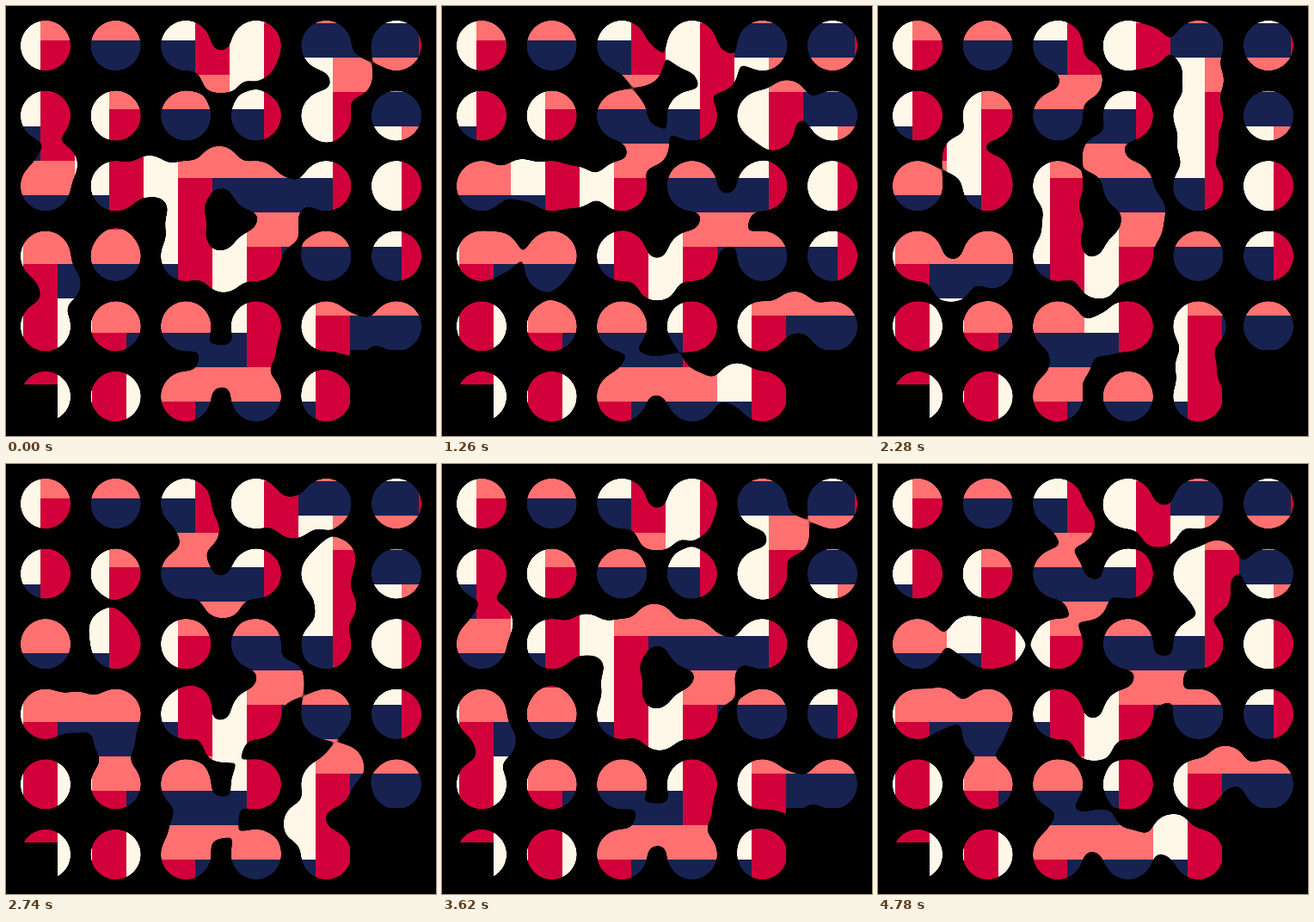
Animation, 500 px wide and 500 px high, one loop 4.8 s. Source, as an HTML page:

```html
<!DOCTYPE html>
<html lang="en">
<head>
<meta charset="utf-8">
<title>Gooey dots</title>
<style>
  html, body { margin: 0; height: 100%; overflow: hidden; background: #000; }
  svg { display: block; width: 100%; height: 100%; }
</style>
</head>
<body>
<svg viewBox="0 0 500 500">
  <defs>
    <filter id="goo" filterUnits="userSpaceOnUse" x="0" y="0" width="500" height="500">
      <feGaussianBlur stdDeviation="8"/>
      <feColorMatrix values="1 0 0 0 0  0 1 0 0 0  0 0 1 0 0  0 0 0 40 -19.5"/>
    </filter>
    <mask id="blobs" maskUnits="userSpaceOnUse" x="0" y="0" width="500" height="500">
      <g id="dots" filter="url(#goo)" fill="#fff"/>
    </mask>
  </defs>
  <g id="weave" mask="url(#blobs)" shape-rendering="crispEdges"/>
</svg>
<script>
const $ = id => document.getElementById(id);
const add = (parent, tag, attrs) => {
  const el = document.createElementNS('http://www.w3.org/2000/svg', tag);
  for (const key in attrs) el.setAttribute(key, attrs[key]);
  return parent.appendChild(el);
};
const weave = $('weave'), dots = $('dots');

// Four bars interlock and repeat along two directions: (80, 80) and (260, -20).
const bars = [
  { fill: '#ff7070', x: 40, y: 0, width: 140, height: 40 },
  { fill: '#172250', x: 80, y: 40, width: 140, height: 40 },
  { fill: '#fff7e8', x: 260, y: -20, width: 40, height: 140 },
  { fill: '#d2003a', x: 300, y: 20, width: 40, height: 140 }
];
for (const bar of bars) {
  for (let a = -7; a < 14; a++) {
    for (let b = -3; b < 3; b++) {
      const x = bar.x + 80 * a + 260 * b, y = bar.y + 80 * a - 20 * b;
      if (x < 500 && y < 500 && x + bar.width > 0 && y + bar.height > 0)
        add(weave, 'rect', { ...bar, x, y });
    }
  }
}
// The weave is unfinished in two corners.
add(weave, 'rect', { x: 400, y: 400, width: 100, height: 100 });
add(weave, 'rect', { x: 0, y: 440, width: 60, height: 60 });

for (let i = 0; i < 36; i++)
  add(dots, 'circle', { cx: 46 + 81.6 * (i % 6), cy: 46 + 81.6 * Math.floor(i / 6), r: 30 });

// Balls circle between the dots: centre x, y, radii x, y (opposite signs turn back), phase in degrees.
const LOOP = 4800, TURN = 1820;
const balls = [
  [237, 77, 13, 9, 0],
  [312, 62, -22, -15, 0],
  [392, 96, 17, -17, 54],
  [378, 150, -8, 20, -50],
  [90, 188, -32, -14, 15],
  [147, 203, 26, -8, 40],
  [250, 171, -12, 16, 80],
  [322, 238, 12, -14, 90],
  [316, 257, 9, 2, 90],
  [212, 267, -4, -20, 45],
  [253, 316, -3, -7, 90],
  [127, 302, 6, 20, -85],
  [73, 306, -16, 22, 50],
  [397, 367, 17, 17, 70],
  [231, 421, 18, -8, 20],
  [268, 406, 22, -24, 10],
  [358, 432, 16, -20, -48]
].map(([x, y, rx, ry, phase]) => ({ x, y, rx, ry, phase, el: add(dots, 'circle', { r: 25 }) }));

function draw(t) {
  for (const { el, x, y, rx, ry, phase } of balls) {
    const angle = (t / TURN + phase / 360) * 2 * Math.PI;
    el.setAttribute('cx', x + rx * Math.cos(angle));
    el.setAttribute('cy', y + ry * Math.sin(angle));
  }
}

const start = performance.now();
function tick() {
  draw((performance.now() - start) % LOOP);
  requestAnimationFrame(tick);
}
tick();
</script>
</body>
</html>
```
